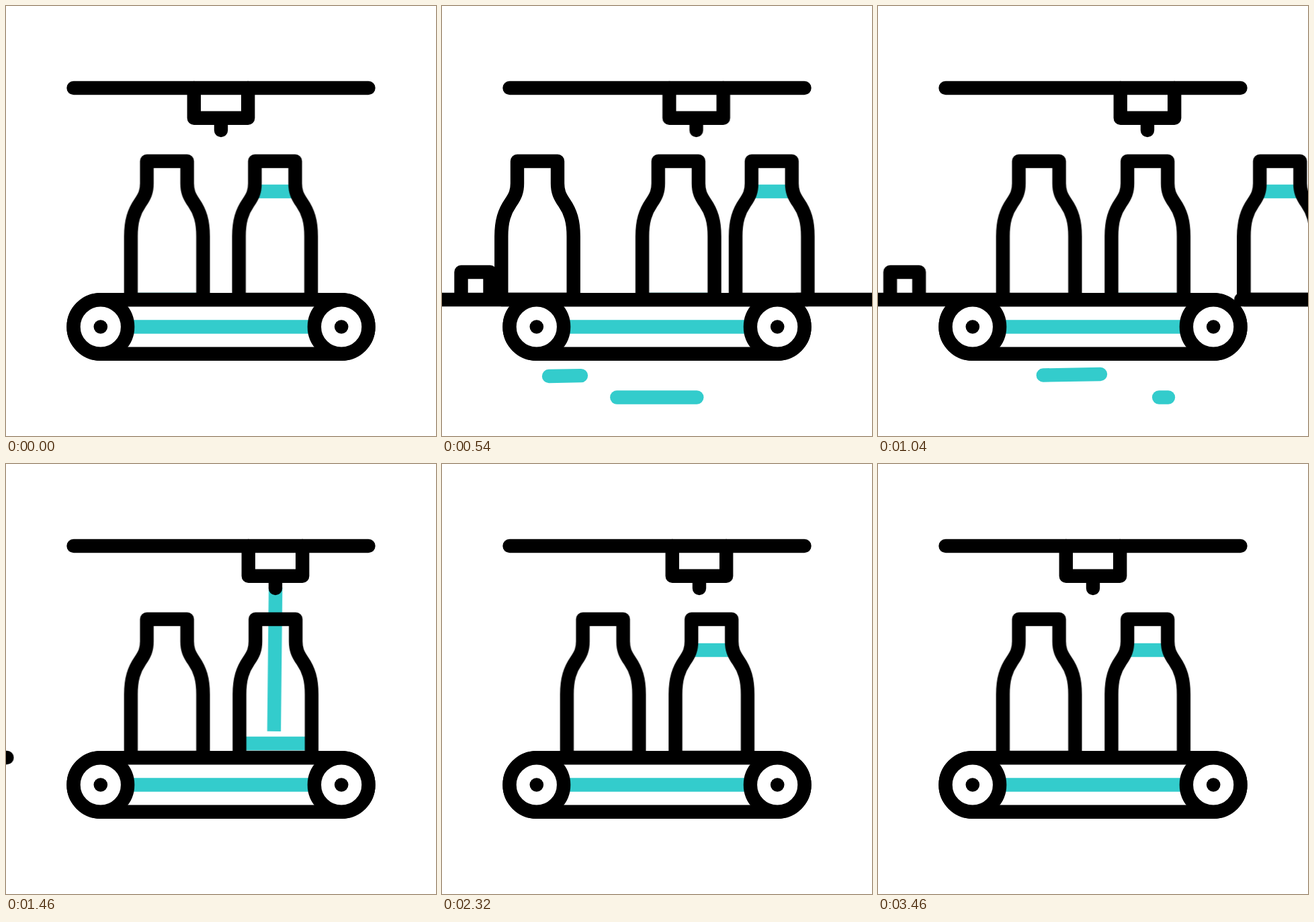
Recreate the animation shown at these times as an HTML page without scripts. Size 640 px wide and 640 px high, loop 3600 ms.

```html
<!DOCTYPE html>
<html lang="en">
<head>
<meta charset="utf-8">
<title>Bottling line</title>
<style>
  html, body { margin: 0; width: 100%; height: 100%; overflow: hidden; background: #fff; }
  svg { display: block; width: 100%; height: 100%; }
  svg * { animation: 3600ms linear infinite; }

  .ink { fill: none; stroke: #000; stroke-width: 20.4; stroke-linecap: round; stroke-linejoin: round; }
  .teal { fill: none; stroke: #3cc; stroke-width: 20.4; }
  .dash { stroke-linecap: round; stroke-dasharray: 119 400; animation-name: dash; }
  .late { animation-delay: 226ms; animation-fill-mode: backwards; }

  .hop { animation-name: hop; }
  .nozzle { animation-name: nozzle; }
  .empty { animation-name: empty; }
  .filled { animation-name: filled; }
  .incoming { animation-name: incoming; }
  .left-cart { animation-name: left-cart; }
  .right-cart { animation-name: right-cart; }
  .level { animation-name: level; }
  .stream { animation-name: stream; }

  @keyframes hop {
    0%, 84.444%, 96.111%, 100% { transform: translateY(0); }
    90.278% { transform: translateY(-74px); }
  }
  @keyframes nozzle {
    0%, 5% { transform: translateX(0); }
    18.889%, 60% { transform: translateX(81px); }
    80%, 100% { transform: translateX(0); }
  }
  @keyframes empty {
    0%, 5% { transform: translateX(239.6px); }
    19.444%, 100% { transform: translateX(401.2px); }
  }
  @keyframes filled {
    0%, 4.444% { transform: translateX(400.4px); }
    19.167%, 22.222% { transform: translateX(526px); }
    42.778%, 100% { transform: translateX(748px); }
  }
  @keyframes incoming {
    0%, 4.444% { transform: translateX(-92px); }
    19.444%, 100% { transform: translateX(239.6px); }
  }
  @keyframes left-cart {
    0%, 4.444% { transform: translateX(-92px); }
    19.444%, 22.222% { transform: translateX(239.6px); }
    42.778%, 100% { transform: translateX(-92px); }
  }
  @keyframes right-cart {
    0%, 4.444% { transform: translateX(728px) scaleX(-1); }
    19.444%, 22.222% { transform: translateX(526px) scaleX(-1); }
    42.778%, 100% { transform: translateX(748px) scaleX(-1); }
  }
  @keyframes level {
    0%, 39.278% { transform: translateY(160px); }
    49.167%, 100% { transform: translateY(0); }
  }
  /* pours down, follows the rising level, then runs dry from the top */
  @keyframes stream {
    0%, 32.222% { stroke-dasharray: 0 0 0 400; }
    39.278% { stroke-dasharray: 0 0 233 400; }
    48.889% { stroke-dasharray: 0 0 93 400; }
    51.667%, 100% { stroke-dasharray: 0 93 0 400; }
  }
  @keyframes dash {
    0%, 4.444% { stroke-dashoffset: 120; }
    30.222%, 100% { stroke-dashoffset: -173; }
  }
</style>
</head>
<body>
<svg viewBox="0 0 640 640">
  <defs>
    <path id="bottle" d="M-53.7 437V343C-53.7 320 -49 306 -40 293C-33 283 -30 276 -30 264V231H30V264C30 276 33 283 40 293C49 306 53.7 320 53.7 343V437Z"/>
    <clipPath id="inside"><use href="#bottle"/></clipPath>
    <path id="cart" d="M-800 437H58M-113.5 437V396H-70.5V437"/>
    <g id="wheel">
      <circle class="ink" r="40.3" style="fill:#fff"/>
      <circle r="10.3"/>
    </g>
  </defs>

  <path class="teal dash" d="M260 582.5H432"/>
  <path class="teal dash late" d="M159 551L331 548"/>

  <g class="hop">
    <use class="ink left-cart" href="#cart"/>
    <use class="ink right-cart" href="#cart"/>
    <use class="ink incoming" href="#bottle"/>

    <g class="empty">
      <g clip-path="url(#inside)"><path class="teal level" d="M-60 277H60"/></g>
      <path class="teal stream" d="M0 184L-2.5 417"/>
      <use class="ink" href="#bottle"/>
    </g>

    <g class="filled">
      <g clip-path="url(#inside)"><path class="teal" d="M-60 276H60"/></g>
      <use class="ink" href="#bottle"/>
    </g>

    <path class="ink" d="M100.5 122H539.5"/>
    <path class="ink nozzle" d="M279.8 122V166.8H360.2V122M320 167V185"/>
  </g>

  <rect class="ink" x="100.5" y="437.2" width="439" height="80.6" rx="40.3" style="fill:#fff"/>
  <path class="teal" d="M160 477.5H480"/>
  <use href="#wheel" x="140.8" y="477.5"/>
  <use href="#wheel" x="499.2" y="477.5"/>
</svg>
</body>
</html>
```
